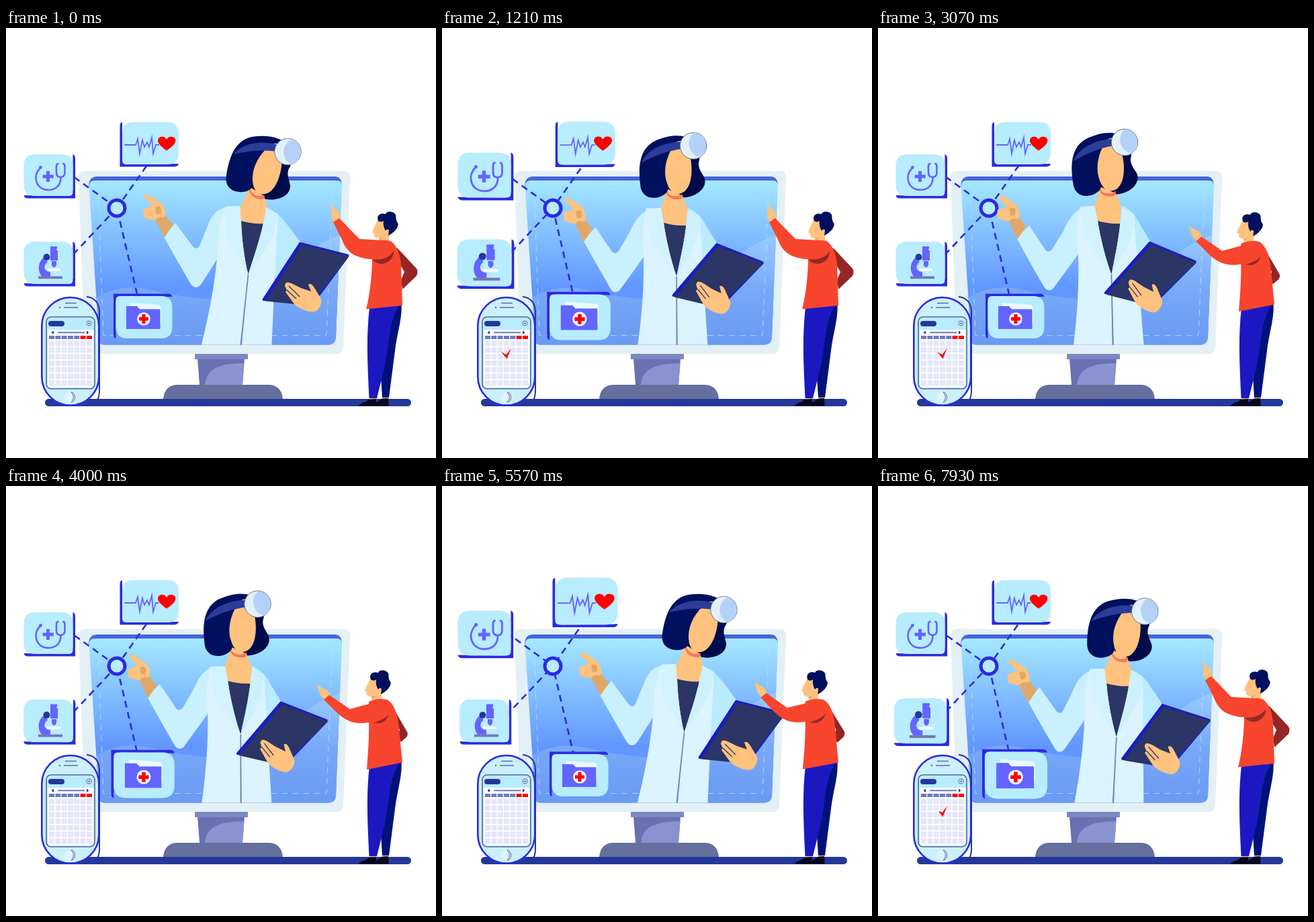
Recreate the animation shown at these times as an HTML page. Size 640 px wide and 640 px high, loop 8000 ms.

```html
<!DOCTYPE html>
<html lang="en">
<head>
<meta charset="utf-8">
<title>Online doctor</title>
<style>
  html, body { margin: 0; width: 100%; height: 100%; overflow: hidden; background: #fff; }
  svg { display: block; width: 100vw; height: 100vh; }
  .coat { fill: #dbf4ff; }
  .sleeve { fill: #cbf0fd; }
  .skin { fill: #ffc27f; }
  .tan { fill: #e0a868; }
  .hair { fill: #00105e; }
  .navy { fill: #2b3566; }
  .deep { fill: #24389a; }
  .violet { fill: #6464ff; }
  .line { fill: none; stroke: #6464ff; stroke-width: 2.6; stroke-linecap: round; stroke-miterlimit: 10; }
  .red { fill: #f00; }
  .link { stroke: #2b2be0; stroke-width: 2.6; stroke-dasharray: 10 7; }
</style>
</head>
<body>
<svg viewBox="0 0 640 640">
  <defs>
    <linearGradient id="sky" x1="0" y1="0" x2="0" y2="1">
      <stop offset="0" stop-color="#a4e8ff"/><stop offset=".66" stop-color="#6196ff"/><stop offset="1" stop-color="#6a9cf8"/>
    </linearGradient>
    <linearGradient id="wave" x1="0" y1="0" x2="0" y2="1">
      <stop offset="0" stop-color="#98cbff"/><stop offset=".5" stop-color="#78a8f8"/><stop offset="1" stop-color="#6a9af2"/>
    </linearGradient>
    <clipPath id="aboveEdge"><rect width="640" height="471.5"/></clipPath>
    <mask id="tickMask" maskUnits="userSpaceOnUse" x="80" y="470" width="30" height="30">
      <path id="tickTrim" d="M88 483L96 490L104 476" fill="none" stroke="#fff" stroke-width="9" pathLength="100" stroke-dasharray="100 200"/>
    </mask>
  </defs>

  <!-- floor and monitor -->
  <rect x="58" y="552" width="545" height="11" rx="5.5" class="deep"/>
  <path d="M234 552Q236 531 256 531H390Q410 531 412 552Z" fill="#66709e"/>
  <path d="M285 492H355L352 531H288Z" fill="#6872b2"/>
  <path d="M296 531C298 508 316 499 354.500 499L352 531Z" fill="#8893cf"/>
  <rect x="281" y="484.500" width="79" height="8.500" fill="#7d88c2"/>
  <path d="M117 213H503Q512 213 512 223L502 475Q501 485 492 485H127Q118 485 117 476L108 222Q108 213 117 213Z" fill="#e3f0f5"/>
  <path d="M123 236Q123 221 136 221H489Q500 221 500 236Z" fill="#4a63dc"/>
  <path d="M123.500 235Q124 227 132 227H492Q500 227 500 235L491 461Q490 471.500 480 471.500H146Q139 471.500 138.500 464Z" fill="url(#sky)"/>
  <path d="M134.500 401C165 384 190 383 225 392C260 400 285 402 305 404C350 402 390 375 425 350C450 330 475 316 497 308L491 461Q490 471.500 480 471.500H146Q139 471.500 138.500 464Z" fill="url(#wave)"/>
  <path d="M137 240H486L477 457.500H145Z" fill="none" stroke="#b6e6ff" stroke-width="1" stroke-dasharray="9 7" opacity=".75"/>

  <!-- phone -->
  <path d="M120 400Q138 402 139 422V540Q139 558 126 560" fill="none" stroke="#24389a" stroke-width="2"/>
  <rect x="53.300" y="401" width="85" height="160.500" rx="42.500" fill="#cbf0fc" stroke="#2b2be0" stroke-width="2.600"/>
  <path d="M88 409.500H105M86 416H107" stroke="#5c6cab" stroke-width="1.400"/>
  <circle cx="80" cy="416" r="1.200" fill="#5c6cab"/>
  <rect x="60" y="430" width="72" height="107" rx="7" fill="#b8ecff" stroke="#55659f" stroke-width="1.600"/>
  <rect x="63" y="436" width="24" height="8" rx="4" class="deep"/>
  <circle cx="123.500" cy="439.500" r="3.500" fill="#fff" stroke="#4a5a9a"/>
  <path d="M121.500 439.500H125.500M123.500 437.500V441.500" stroke="#4a5a9a"/>
  <path d="M62 449H130.500V530Q130 535 125 535H67Q62 535 62 530Z" fill="#fff"/>
  <path d="M71 450.500V456L67.500 453.300ZM120 450.500V456L123.500 453.300Z" class="deep"/>
  <path d="M77 453.300H117" stroke="#6b7cc0" stroke-width="2"/>
  <g id="calendar"></g>
  <path d="M88 482L95.500 486L103 476.500L96.500 492.500Z" fill="#f21414" mask="url(#tickMask)"/>
  <circle cx="95" cy="549.500" r="7.800" fill="#def5ff"/>
  <path d="M97 542A7.800 7.800 0 0 1 97 557C102 552 101 546 97 542Z" fill="#fff" stroke="#4a5a9a" stroke-width="1"/>

  <!-- links and cards -->
  <path class="link" d="M100 221L165 268"/>
  <path class="link" d="M210 204L165 268"/>
  <path class="link" d="M99 338L165 268"/>
  <path class="link" d="M195.500 398L165 268"/>
  <circle cx="165" cy="268" r="12" fill="#b8ecff" stroke="#2b2be0" stroke-width="5"/>

  <g class="card" data-box="205.500 430.500 42 31.500 -1 -1" data-start="0">
    <path d="M184 409L227 412Q231 413 231 418V440H188Z" fill="#e9fbff"/>
    <path class="violet" d="M179 414H195L199 418.500H229.500V448H179Z"/>
    <circle cx="205" cy="433" r="9.800" fill="#e6f6ff"/>
    <path class="red" d="M202.500 426H207.500V430.500H212V435.500H207.500V440H202.500V435.500H198V430.500H202.500Z"/>
  </g>
  <g class="card" data-box="63 349.500 36.500 31.500 1 1" data-start="350">
    <path class="violet" d="M56 342C45 350 48 368 56 371H66V363C56 362 55 354 62 348Z"/>
    <rect x="48" y="369.500" width="36" height="3.800" fill="#7279b5"/>
    <circle cx="60.500" cy="341" r="5" class="deep"/>
    <path class="violet" d="M66 325H76V328H75.500V331H77V346H66ZM68 347H75V353L73 356H70L68 353Z"/>
    <rect x="61" y="358" width="20" height="3.500" fill="#fff"/>
  </g>
  <g class="card" data-box="63 219 36.500 31 1 1" data-start="750">
    <path class="line" d="M51 208C38 222 46 241 63 241C75 241 82 233 81.500 222M77.500 202Q75 202 75 206V215Q75 222 81 222Q87.500 222 87.500 215V206Q87.500 202 85 202"/>
    <circle cx="51.500" cy="207.500" r="2.400" class="violet"/>
    <path class="violet" d="M60 213H65V218.500H71V223.500H65V229H60V223.500H54.500V218.500H60Z"/>
  </g>
  <g class="card" data-box="215 171.500 42 31.500 -1 1" data-start="1130">
    <path class="line" style="stroke-width:1.800" d="M177 174H193L196 165L199 187L203 167L206 177L210 170L213 177L217 163L219 187L223 174H227"/>
    <path class="red" d="M239 182.500C226 173 224 168 227.500 163.500C231 160.500 237 161 239 166C241 161 247 160.500 251 163.500C254.500 168 252 174 239 182.500Z"/>
  </g>

  <!-- doctor -->
  <g class="head">
    <path fill="#000b4c" d="M362 180L421 178C426 190 425 200 423 206C416 216 421 224 423 234C424 251 402 259 384 254L362 240Z"/>
  </g>
  <path class="skin bob" data-from="M362 236L384 250L390 270L386 294L349 291L348 268Q355 256 362 236Z" data-to="M330 236L354 246L362 266L360 291L324 291L320 268Q327 256 330 236Z"/>
  <g clip-path="url(#aboveEdge)">
    <path class="bob" fill="#b9ecff" data-from="M386 267C405 274 412 284 419 293L440 321L402 385L396 330Z" data-to="M362 264C378 270 386 284 391 294L406 319L366 372L372 330Z"/>
    <path class="sleeve arm" data-from="M328 267C312 270 306 280 300 295L288 324C285 330 281 328 278 325L252 290L235 311C248 335 264 362 275 381C281 389 287 387 292 379L318 338Z" data-to="M305 267C290 274 282 288 276 302L260 328C256 334 252 334 249 330L225 294L206 312C220 338 236 366 247 385C251 392 258 392 262 386L300 334Z"/>
    <g id="body">
      <path class="navy" d="M349.500 287Q366 292 384 291L374 330L360.500 370L350 320Z"/>
      <path class="coat" d="M326 266L348 265L350 288C351 315 355 345 360.500 367L349 471L348 490H287L291 471C304 420 315 360 317 300Z"/>
      <path class="coat" d="M388 268L405 277L400 370L395.500 471V490H349L351 471L360.500 367C368 343 378 315 383.500 288Z"/>
      <path fill="#cdf1fd" d="M388 268L405 277C402 300 396 315 386 330L360.500 367C368 343 378 315 383.500 288Z"/>
      <path fill="#d3f3fe" d="M326 266L328 312L360.500 367C355 345 351 315 350 288L348 265Z"/>
      <path d="M360.500 367L349.500 471V490" fill="none" stroke="#6f86b5" stroke-width="1.800"/>
    </g>
  </g>
  <g id="board">
    <path fill="#1c1cc4" d="M437 318.500L510 337L510.500 340L460 408L383 406Q381 405 382 403Z"/>
    <path class="navy" d="M440 322.500L510.500 339.500L461 402Q455 413 440 412L386 406.500Z"/>
    <path class="skin" d="M416 380C420 376 430 383 439 387L454 392L450 382C453 378 458 384 461 390L469 403C471 412 464 423 457 422.500C445 422 432 416 427 408L416 393L418 390L415 384Z"/>
    <path d="M421 384L437 400M418 390L432 403" stroke="#2b3566" stroke-width="1.300" fill="none"/>
  </g>
  <g id="hand">
    <path class="tan" d="M221 284L236 278L248 293L236 312Z"/>
    <path class="skin" d="M204 270L219 264.500C212 259 206 253 205 250C206 246 211 247 230 260C237 266 239 275 236 281C232 283 228 278 222 286C214 285 208 284 205 281Z"/>
    <path class="tan" d="M222 267Q228 264 231 268L231 275Q228 278 224 277Z"/>
  </g>
  <g class="head">
    <path fill="#f27a5e" d="M362 234C364 248 374 252 385 249L383 255C372 256 364 250 362 242Z"/>
    <path class="skin" d="M367 228C365 212 372 196 383 182C396 168 411 176 411 192C411 215 403 240 389 246C376 251 368 242 367 228Z"/>
    <path class="hair" d="M327.500 224C330 204 336 168 366 162C392 158 414 164 421 178L386 181C374 194 366 210 367 227C368 234 366 239 362 241C350 248 327 244 327.500 224Z"/>
    <path class="skin" d="M392 174Q398 171 404 172V176Z"/>
    <path fill="#2b3c9a" d="M338 188C352 171 380 167 405 174L403 184C382 181 358 183 338 188Z"/>
    <circle cx="419.500" cy="184" r="19.700" fill="#e2f1f8" stroke="#5f7196" stroke-width=".9"/>
    <path fill="#b4d2f7" d="M426 165.500C442 172 443 196 426 203C409 198 409 172 426 165.500Z"/>
  </g>

  <!-- visitor -->
  <path fill="#942726" data-man data-from="M582 327L611 358Q614 363 611 369L590 389L588 375L593 363L580 342Z" data-to="M578 333L597 366Q599 370 596 374L588 381L582 372L586 363L576 342Z"/>
  <path class="skin" d="M541 549H551V553H541ZM561 548H569V552H561Z"/>
  <path fill="#00127a" d="M566 416L588.500 411C590 432 582 455 579 480L570 550H560L557 505Z"/>
  <path fill="#1b18c2" d="M541 416L587 411C570 432 571 468 564 502L552 551H540.500C538 500 536 460 541 416Z"/>
  <path fill="#05081c" d="M525 562.500Q526 559 534 557L541 552.500L551 552Q550 558 552 557L560 551.500L569 551L569.500 562.500Z"/>
  <path class="skin" data-man data-from="M488 288C484 284 483 278 484.500 273L484.500 263C487 261 488 265 489 268L495 273C498 277 497 282 496 285Z" data-to="M475 318C470 315 466 310 466 305L462 297C464 295 466 298 470 300L477 303C481 306 481 309 481 312Z"/>
  <g id="visitorHead">
    <path class="skin" d="M553 286L547 298L545 304L548 306Q546 312 555 313L556 319H570V308L572 300L566 286Z"/>
    <path fill="#e0a868" d="M555 313L563 310L556 316Z"/>
    <path class="hair" d="M554 287C551 280 556 274 565 277C566 272 577 272 580 278C581 284 580 286 583.500 291C585 297 576 306 569 309L570 301Q567 298 565 302C562 297 561 292 562 287Q558 290 554 287Z"/>
  </g>
  <path fill="#f8452e" data-man data-from="M546 318C556 315 568 315 574 318C583 326 587 338 588 352L590 413L536 418.500C542 395 545 365 545 340Z" data-to="M540 321C548 317 558 316 567 318C577 323 582 338 584 352L590 411.500L537 422C539 395 541 370 540 345Z"/>
  <path fill="#8f2a28" data-man data-from="M545 344C558 346 570 343 577 331C578 343 568 351 558 351Q550 350 545 344Z" data-to="M547 352C556 350 564 346 570 340C567 348 562 352 556 353Q551 353 547 352Z"/>
  <path fill="#f8452e" data-man data-from="M487 289L496 283L526 314L562 316C577 317 581 329 574 336C566 345 545 346 530 342C512 338 505 328 500 315Z" data-to="M473 318L481 311L512 332L545 323C560 316 573 321 570 333C566 345 550 352 530 353C512 353 502 346 492 337Z"/>
</svg>
<script>
const SVG = 'http://www.w3.org/2000/svg';
const $ = s => document.querySelector(s);
const $$ = s => [...document.querySelectorAll(s)];
const LOOP = 8000, CYCLE = 7200, HALF = CYCLE / 2;

const smooth = x => (x = Math.min(1, Math.max(0, x)), x * x * (3 - 2 * x));
const thereAndBack = (u, start, length) =>
  smooth((u - start) / length) - smooth((u - start - HALF) / length);
const move = (el, value) => el.setAttribute('transform', value);

function add(parent, name, attrs, before = null) {
  const el = document.createElementNS(SVG, name);
  for (const key in attrs) el.setAttribute(key, attrs[key]);
  return parent.insertBefore(el, before);
}

// Blends two paths that share the same commands.
function morph(el, k) {
  const goal = el.dataset.to.match(/[\d.]+/g);
  let i = 0;
  el.setAttribute('d', el.dataset.from.replace(/[\d.]+/g, n => (+n + (goal[i++] - n) * k).toFixed(2)));
}

for (let col = 0; col < 7; col++) {
  const x = 64 + col * 9.33;
  add($('#calendar'), 'rect', { x, y: 458, width: 8, height: 5, fill: col > 4 ? '#f00' : '#6b7cc0' });
  for (let row = 0; row < 7; row++)
    add($('#calendar'), 'rect', { x, y: 465.5 + row * 9.8, width: 8, height: 8, fill: '#e5e6f8' });
}

const cards = $$('.card').map(el => {
  const [cx, cy, w, h, fx, fy] = el.dataset.box.split(' ').map(Number);
  const r = 17;
  const base = add(el, 'g', { transform: `translate(${cx} ${cy}) scale(${fx} ${fy})` }, el.firstChild);
  add(base, 'path', {
    fill: '#2b2be0',
    d: `M${-w} ${h - 1}Q${1 - w} ${h + 3.5} ${6 - w} ${h + 3.5}H${w + 3.5}V${6 - h}Q${w + 3.5} ${1 - h} ${w} ${-h}V${h - 8}H${w - 8}V${h}Z`
  });
  add(base, 'path', {
    fill: '#b8ecff',
    d: `M${r - w} ${-h}H${w - r}Q${w} ${-h} ${w} ${r - h}V${h - 6}Q${w} ${h} ${w - 6} ${h}H${r - w}Q${-w} ${h} ${-w} ${h - r}V${r - h}Q${-w} ${-h} ${r - w} ${-h}Z`
  });
  return { el, cx, cy, start: +el.dataset.start };
});

const heads = $$('.head'), bobbing = $$('.bob'), arm = $('.arm');
const visitor = $$('[data-man]'), links = $$('.link');

function drawDoctor(u) {
  const p = thereAndBack(u, 50, 1500);
  const dip = Math.sin(Math.PI * p);
  const armDip = dip * (u < HALF ? 8 : 3);
  const lean = .125 * p;
  heads.forEach(el => move(el, `translate(${374 - 32 * p} ${245 - 3 * p + 9.5 * dip}) rotate(${-17.5 * p}) translate(-374 -245)`));
  bobbing.forEach(el => { morph(el, p); move(el, `translate(0 ${7.5 * dip})`); });
  morph(arm, p);
  move(arm, `translate(0 ${armDip})`);
  move($('#body'), `matrix(1 0 ${lean} 1 ${-471 * lean} ${7 * dip})`);
  move($('#board'), `translate(${-33 * p} ${6 * dip - p}) rotate(${8.5 * p} 437 319)`);
  move($('#hand'), `translate(${-27 * p} ${2 * p + 1.25 * armDip}) rotate(${3 * p} 225 280)`);
}

function drawVisitor(u) {
  const m = thereAndBack(u, 1650, 1550);
  visitor.forEach(el => morph(el, m));
  move($('#visitorHead'), `translate(${-11 * m} ${m})`);
}

function drawCards(u) {
  for (const { el, cx, cy, start } of cards) {
    const x = (u - start) / 1650;
    const size = 1 + (x > 0 && x < 1 ? .11 * Math.sin(Math.PI * x) : 0);
    move(el, `translate(${cx} ${cy}) scale(${size}) translate(${-cx} ${-cy})`);
  }
  const flow = 1.5 + 17 * smooth(u / HALF);
  links.forEach(el => el.setAttribute('stroke-dashoffset', -flow));
}

function drawTick(t) {
  const u = (t + 3980) % 4740;
  const shown = smooth(u / 560), erased = smooth((u - 2310) / 560);
  const trim = $('#tickTrim');
  trim.setAttribute('stroke-dasharray', `0 ${100 * erased} ${100 * (shown - erased)} 300`);
  trim.setAttribute('visibility', shown - erased > .002 ? 'visible' : 'hidden');
}

function frame(now) {
  const t = now % LOOP;
  drawDoctor(t % CYCLE);
  drawVisitor(t % CYCLE);
  drawCards(t % HALF);
  drawTick(t);
  requestAnimationFrame(frame);
}
frame(0);
</script>
</body>
</html>
```
